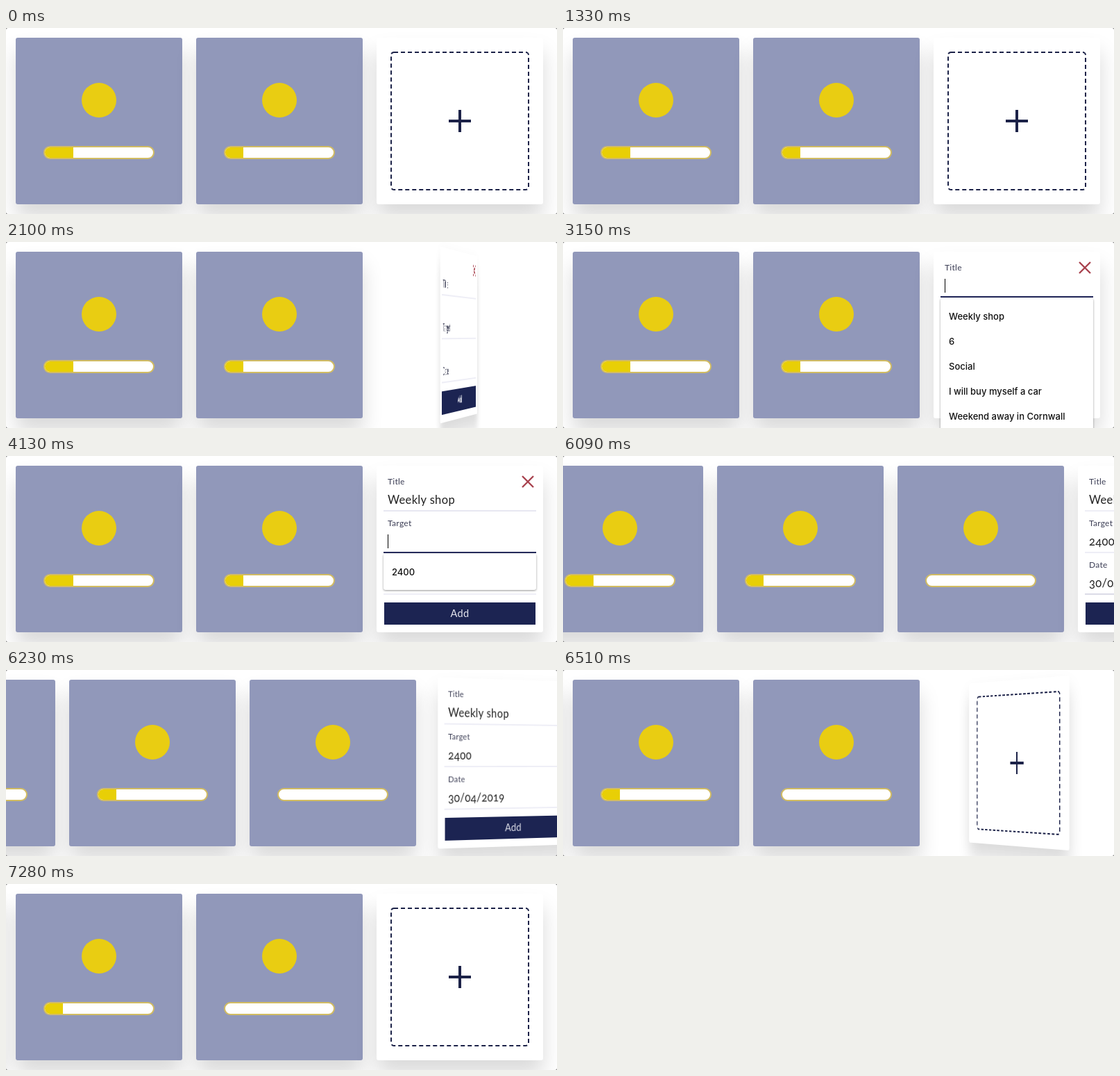
Animation, 794 px wide and 268 px high, one loop 7.7 s. Source, as an HTML page:

```html
<!DOCTYPE html>
<html lang="en">
<head>
<meta charset="utf-8">
<style>
  html, body { margin: 0; width: 100%; height: 100%; overflow: hidden; background: #777; }
  * { box-sizing: border-box; }
  #stage { position: relative; width: 794px; height: 268px; overflow: hidden; background: #fff; border-radius: 3px; }
  .card, .face { position: absolute; width: 240px; height: 240px; border-radius: 3px; }
  .card { top: 14px; }
  .goal, .face { box-shadow: 0 20px 30px rgba(0, 0, 0, .15); }
  .goal { background: #9198ba; }
  .badge { position: absolute; left: 95px; top: 65px; width: 50px; height: 50px; border-radius: 50%; background: #e9cd12; }
  .bar { position: absolute; left: 40px; top: 156px; width: 160px; height: 19px; overflow: hidden;
         background: #fff; border: 2px solid #d2bc62; border-radius: 10px; }
  .bar i { display: block; height: 100%; background: #e8cf06; }
  #add { perspective: 2000px; }
  #flip { width: 240px; height: 240px; transform-style: preserve-3d; }
  .face { background: #fff; backface-visibility: hidden; }
  .face svg { position: absolute; left: 0; top: 0; fill: none; }
  .back { transform: rotateY(180deg); font: 16.5px/20px Lato, sans-serif; letter-spacing: .35px; color: #222; }
  .field { position: absolute; left: 10px; width: 220px; height: 60px; border-bottom: 2px solid; }
  .field label, .field p { position: absolute; left: 6px; top: 33px; margin: 0; white-space: pre;
         font-variant-numeric: oldstyle-nums; }
  .field label { font-size: 16px; color: #3c3e55; transform-origin: 0 50%; }
  .field p { height: 20px; border-right: 1px solid; }
  .button { position: absolute; left: 11px; top: 197px; width: 218px; height: 32px; background: #1c2452;
         color: #e4e5ee; font-size: 14.5px; line-height: 32px; text-align: center; }
  .menu { position: absolute; left: 544px; width: 220px; padding: 8px 0; background: #fff; border-radius: 3px;
         box-shadow: 0 1px 3px rgba(0, 0, 0, .42); font: 500 13px/36px Inter, sans-serif; color: #111; }
  .menu div { padding-left: 12px; height: 36px; white-space: nowrap; }
</style>
</head>
<body>
<div id="stage">
  <div class="card" id="add"><div id="flip">
    <div class="face">
      <svg width="240" height="240" stroke="#1c2248">
        <rect x="21" y="21" width="198" height="198" rx="4" stroke-width="2" stroke-dasharray="6 4"/>
        <path d="M104 120h32M120 104v32" stroke-width="4"/>
      </svg>
    </div>
    <div class="face back" id="form">
      <svg width="240" height="40" stroke="#a8424e" stroke-width="2.4"><path d="M210 15l16 16m0-16l-16 16"/></svg>
      <div class="button">Add</div>
    </div>
  </div></div>
</div>
<script>
const LOOP = 7700, STEP = 260;
const OPEN = 1770, SUBMIT = 5951, CLOSE = 6095;

const fields = [
  { label: 'Title', focus: 2900, hover: 3290, pick: 3500, blur: 3900,
    options: ['Weekly shop', '6', 'Social', 'I will buy myself a car', 'Weekend away in Cornwall'] },
  { label: 'Target', focus: 3900, hover: 4270, pick: 4480, blur: 4700, options: ['2400'] },
  { label: 'Date', focus: 4700, hover: 5000, pick: 5290, blur: 5900, options: ['30/04/2019'] }
];

const stage = document.getElementById('stage');
const add = document.getElementById('add');
const flip = document.getElementById('flip');
const form = document.getElementById('form');

function el(parent, tag, className = '', text = '') {
  const node = document.createElement(tag);
  node.className = className;
  node.textContent = text;
  return parent.appendChild(node);
}

const goals = [26, 16.5, 0].map(percent => {
  const card = el(stage, 'div', 'card goal');
  el(card, 'div', 'badge');
  el(el(card, 'div', 'bar'), 'i').style.width = percent + '%';
  return card;
});
stage.append(add);

fields.forEach((f, i) => {
  f.box = el(form, 'div', 'field');
  f.box.style.top = 6 + 60 * i + 'px';
  f.tag = el(f.box, 'label', '', f.label);
  f.value = el(f.box, 'p');
  f.menu = el(stage, 'div', 'menu');
  f.menu.style.top = 81 + 60 * i + 'px';
  f.rows = f.options.map(text => el(f.menu, 'div', '', text));
});

const clamp = x => Math.min(1, Math.max(0, x));

function bezier(x1, y1, x2, y2) {
  const at = (a, b, u) => 3 * a * u * (1 - u) ** 2 + 3 * b * u * u * (1 - u) + u ** 3;
  return x => {
    let lo = 0, hi = 1;
    for (let i = 0; i < 24; i++) {
      const mid = (lo + hi) / 2;
      if (at(x1, x2, mid) < x) lo = mid; else hi = mid;
    }
    return x <= 0 ? 0 : x >= 1 ? 1 : at(y1, y2, lo);
  };
}
const ease = bezier(.25, .1, .25, 1);
const easeInOut = bezier(.42, 0, .58, 1);
const mix = (a, b, p) => a.map((v, i) => v + (b[i] - v) * p);

function drawField(f, t) {
  const floated = ease(clamp((t - f.focus) / 300));
  const active = floated - ease(clamp((t - f.blur) / 300));
  const focused = t >= f.focus && t < f.blur;
  const since = t - (t < f.pick ? f.focus : f.pick);
  f.tag.style.transform = `translateY(${-27 * floated}px) scale(${1 - .25 * floated})`;
  f.box.style.borderColor = `rgb(${mix([238, 238, 246], [30, 36, 86], active)})`;
  f.value.textContent = t >= f.pick ? f.options[0] : '';
  f.value.style.borderColor = focused && since % 1000 < 500 ? '#000' : 'transparent';
  f.menu.style.display = t >= f.focus + 70 && t < f.pick ? '' : 'none';
  f.rows[0].style.background = t >= f.hover ? '#e8e8ea' : '';
}

function draw(t) {
  const submitted = t >= SUBMIT;
  const scroll = STEP * easeInOut(clamp((t - SUBMIT) / 450));
  const place = (node, slot) => node.style.left = 14 + STEP * slot - scroll + 'px';
  goals.forEach(place);
  goals[2].style.display = submitted ? '' : 'none';
  place(add, submitted ? 3 : 2);

  const turn = ease(clamp((t - OPEN) / 1000)) - ease(clamp((t - CLOSE) / 1000));
  flip.style.transform = `rotateY(${-180 * turn}deg)`;
  fields.forEach(f => drawField(f, t));
}

const start = performance.now();
function tick() {
  draw((performance.now() - start) % LOOP);
  requestAnimationFrame(tick);
}
tick();
</script>
</body>
</html>
```
